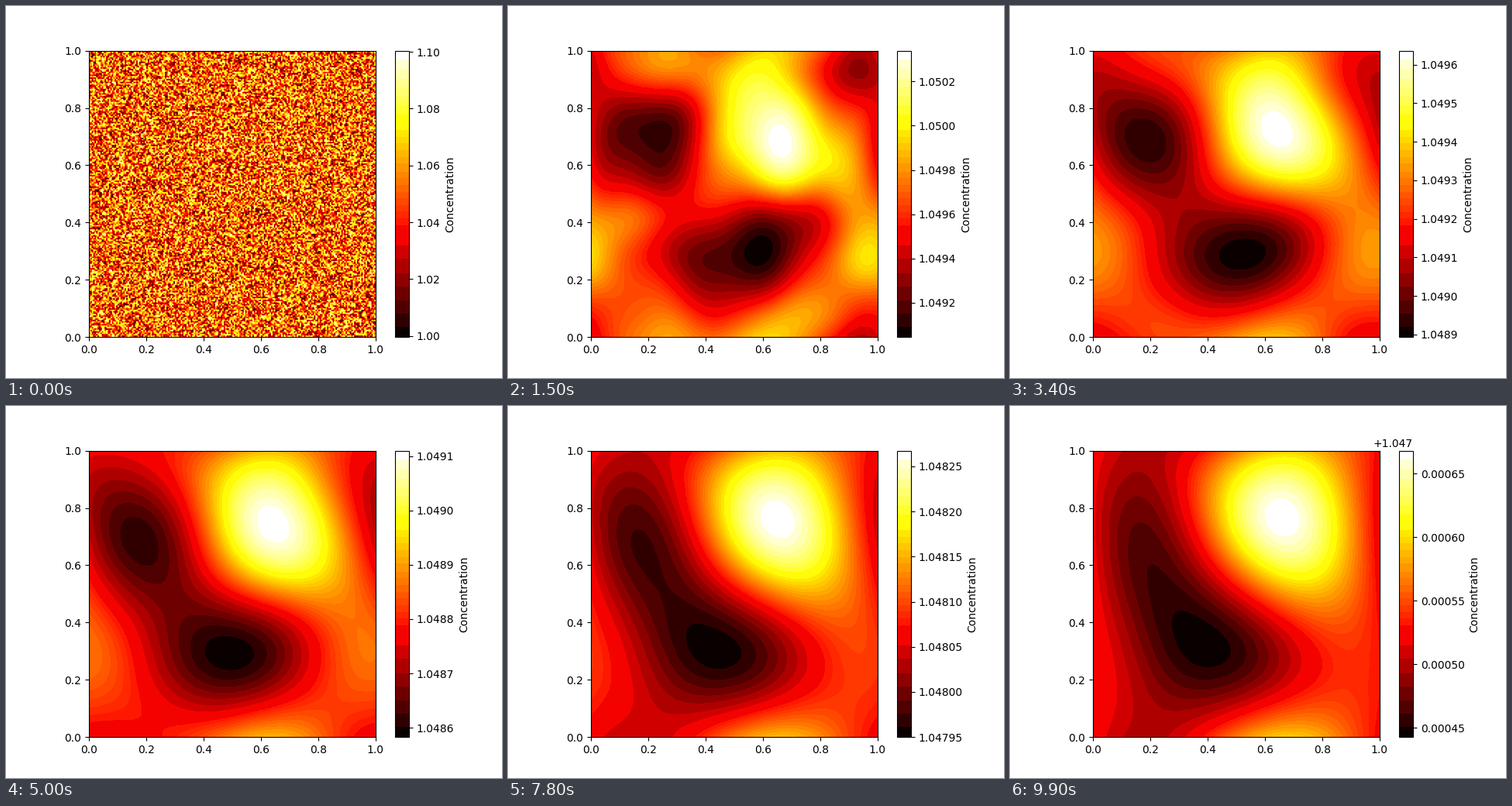
Recreate the animation shown at these times as a matplotlib script. Size 640x480 px, loop 10000 ms.

```python
import numpy as np
import matplotlib.pyplot as plt
from matplotlib.animation import FuncAnimation
from matplotlib.colors import ListedColormap

N = 200           # grid cells per side
FRAMES = 100
STEP = 100        # ms
RATE = 0.125      # decay of the longest wave, per second
T_REF = 1.5       # time (s) at which the wave weights hold

# Long waves in percent of the span at T_REF: rows run over y, columns over x,
# both in the order 1, cos, sin, cos of double, sin of double.
WAVES = np.array([[0, -1.6, -11.8, 0.4, 1.8],
                  [2.7, -7.5, 6.6, -5.1, 5.1],
                  [-8.1, 27.0, 17.8, -1.9, -4.4],
                  [3.9, -5.0, 6.9, -3.1, 1.8],
                  [2.9, -2.5, -10.8, -2.7, -0.9]])


def span(t):
    """Highest minus lowest concentration."""
    early = 1 + 0.9 * np.exp(-4 * t)
    return 1.812e-3 * early * (t + 2.25e-4) ** -0.402 * np.exp(-0.1174 * t)


def middle(t):
    """Halfway between lowest and highest concentration."""
    return 1.050164 - 2.635e-4 * t - 1.64e-4 * np.exp(-(t / 1.72) ** 2)


def banded_hot():
    """The hot map in steps: 8 of red, 16 of green, 8 of blue."""
    rgb = plt.get_cmap("hot")(np.arange(256), bytes=True)[:, :3].astype(int)
    _, band = np.unique(rgb // [32, 16, 32], axis=0, return_inverse=True)
    band = band.ravel()
    colors = np.array([rgb[band == b].mean(axis=0)
                       for b in range(band.max() + 1)])
    colors[0], colors[-1] = (10, 0, 0), (255, 255, 255)
    return ListedColormap(colors[band] / 255)


angle = 2 * np.pi * (np.arange(N) + 0.5) / N
basis = np.array([np.ones(N), np.cos(angle), np.sin(angle),
                  np.cos(2 * angle), np.sin(2 * angle)])
order = np.array([0, 1, 1, 2, 2])
long_k2 = np.add.outer(order ** 2, order ** 2)
weights = WAVES / 100 * span(T_REF)

# Short waves come from random noise
freq = np.fft.fftfreq(N, 1 / N)
kx, ky = np.meshgrid(freq, freq)
short_k2 = kx ** 2 + ky ** 2
rng = np.random.default_rng(7)
short = np.fft.fft2(0.1 * rng.random((N, N)))
short[np.maximum(abs(kx), abs(ky)) <= 3] = 0


def field(t):
    noise = np.fft.ifft2(short * np.exp(-RATE * short_k2 * t)).real
    decayed = weights * np.exp(-RATE * long_k2 * (t - T_REF))
    u = noise + basis.T @ decayed @ basis
    u = (u - u.min()) / (u.max() - u.min())
    return middle(t) + (u - 0.5) * span(t)


fig, ax = plt.subplots(figsize=(6.4, 4.8), dpi=100)
image = ax.imshow(field(0), cmap=banded_hot(), origin="lower",
                  extent=(0, 1, 0, 1))
fig.colorbar(image, ax=ax, label="Concentration")


def update(i):
    u = field(i * STEP / 1000)
    image.set_data(u)
    image.set_clim(u.min(), u.max())
    return [image]


anim = FuncAnimation(fig, update, frames=FRAMES, interval=STEP, repeat=True,
                     repeat_delay=0)
plt.show()
```
